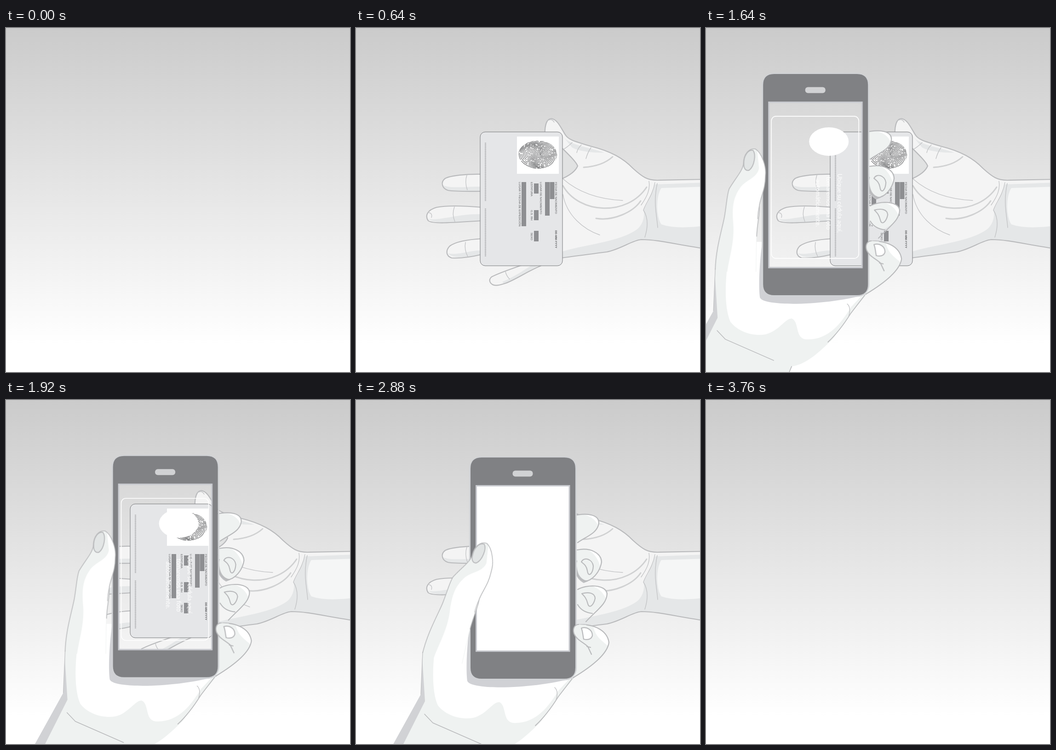
An HTML page for the animation above (3800 ms loop, 748 px wide and 748 px high).

```html
<!DOCTYPE html>
<html lang="es">
<head>
<meta charset="utf-8">
<title>Captura de cédula</title>
<style>
html, body { margin: 0; width: 100%; height: 100%; overflow: hidden; }
body { background: linear-gradient(#cbcbcb, #fff 92%); }
svg { display: block; width: 100vw; height: 100vh; }

.out { fill: none; stroke: #b9babc; stroke-width: 2.2; stroke-linecap: round; stroke-linejoin: round; }
.skin { fill: #f4f4f4; }
.skin2 { fill: #eff2f1; }
.shade { fill: #e5e7e8; }
.white { fill: #fff; }
.fold { fill: none; stroke: #d0d1d2; stroke-width: 3; stroke-linecap: round; }
.thin { fill: none; stroke: #c3c4c6; stroke-width: 1.4; stroke-linecap: round; }
.label { font: 6px "Liberation Sans", Arial, sans-serif; fill: #58595b; }
.guide text { font: 13px Lato, "Open Sans", sans-serif; fill: #fff; text-anchor: middle; }

#open, #holder, #thumb, #flash { animation: 3800ms linear infinite; }
#open { animation-name: open; transform-origin: 374px 374px; }
#holder { animation-name: holder; }
#thumb { animation-name: press; transform-origin: 145px 550px; }
#flash { animation-name: flash; }

/* quadratic ease-out on the way in, quadratic ease-in on the way out */
@keyframes open {
  0%, 1.0526% { transform: translate(650px, 0) scale(1.2); animation-timing-function: cubic-bezier(.333, .667, .667, 1); }
  16.842%, 92.632% { transform: none; animation-timing-function: cubic-bezier(.333, 0, .667, .333); }
  98.947%, 100% { transform: translate(648px, 180px); }
}
@keyframes holder {
  0%, 29.474% { transform: translate(-597px, -120px); animation-timing-function: cubic-bezier(.333, .667, .667, 1); }
  54.737%, 92.632% { transform: none; animation-timing-function: cubic-bezier(.333, 0, .667, .333); }
  98.947%, 100% { transform: translate(-396px, 648px); }
}
@keyframes press {
  0%, 64.21% { transform: none; animation-timing-function: ease-in-out; }
  75.789% { transform: rotate(12deg); animation-timing-function: ease-in-out; }
  81.053%, 100% { transform: none; }
}
@keyframes flash {
  0%, 64.21% { opacity: 0; }
  74.737%, 76% { opacity: 1; }
  81.053%, 100% { opacity: 0; }
}
</style>
</head>
<body>
<svg viewBox="0 0 748 748">
  <defs>
    <clipPath id="oval"><ellipse cx="395" cy="275.500" rx="42" ry="30.500"/></clipPath>
  </defs>

  <!-- open hand with the card -->
  <g id="open">
    <!-- fingers -->
    <g>
      <path class="skin" d="M275 318C240 317 205 321 194 327C183 335 187 349 200 353C215 356 250 355 275 355Z"/>
      <path class="shade" d="M190 342C205 350 240 344 275 345V355H210C197 354 191 349 190 342Z"/>
      <path class="out" d="M275 318C240 317 205 321 194 327C183 335 187 349 200 353C215 356 250 355 275 355"/>
      <path class="thin" d="M241 320Q236 335 242 352"/>
      <path class="skin" d="M275 390C240 387 200 385 175 390C154 396 150 409 157 419C166 426 200 424 275 419Z"/>
      <path class="shade" d="M157 415C180 420 230 402 275 405V419C230 422 170 428 157 415Z"/>
      <path class="out" d="M275 390C240 387 200 385 175 390C154 396 150 409 157 419C166 426 200 424 275 419"/>
      <path class="thin" d="M214 389Q208 405 215 421"/>
      <path class="thin" d="M156 401Q167 402 164 412"/>
      <path class="skin" d="M275 458C240 460 215 466 204 474C194 484 196 496 208 500C225 501 250 498 275 492Z"/>
      <path class="shade" d="M200 490C225 495 250 482 275 484V492C250 498 212 504 200 490Z"/>
      <path class="out" d="M275 458C240 460 215 466 204 474C194 484 196 496 208 500C225 501 250 498 275 492"/>
      <path class="thin" d="M238 466Q235 482 243 497"/>
    </g>
    <!-- thumb, palm, arm and little finger -->
    <path class="skin" d="M411 240C409 208 416 197 425 197C438 199 445 216 455 232C463 245 482 248 510 257C555 268 582 284 602 305C624 325 634 331 655 331L760 329V480C700 472 660 460 620 460C600 462 575 481 545 487C512 491 480 496 445 500L402 517C370 530 345 549 322 556C310 560 302 561 297 558C289 553 289 546 295 541C312 532 335 525 365 514Z"/>
    <path class="shade" d="M445 487C500 470 575 465 612 437C626 425 628 405 625 395C632 382 645 365 650 340L760 336V480C700 472 660 460 620 460C600 462 575 481 545 487C512 491 480 496 445 500Z"/>
    <path d="M664 348L760 345V430C725 434 690 436 664 427C652 410 652 365 664 348Z" fill="#f5f6f6"/>
    <path class="skin" d="M625 395C632 382 645 365 647 340L632 328L600 370Z"/>
    <path class="shade" d="M318 552C345 541 365 526 385 514H402C370 530 345 549 322 556Z"/>
    <path d="M445 258C462 275 478 290 482 300C477 312 462 322 445 329Z" fill="#e1e2e2"/>
    <path class="out" d="M445 258C462 275 478 290 482 300C477 312 462 322 445 329"/>
    <path class="shade" d="M452 238C468 256 510 260 540 271C518 272 484 268 470 260Z"/>
    <path class="out" d="M411 240C409 208 416 197 425 197C438 199 445 216 455 232C463 245 482 248 510 257C555 268 582 284 602 305C624 325 634 331 655 331L760 329M760 480C700 472 660 460 620 460C600 462 575 481 545 487C512 491 480 496 445 500M402 517C370 530 345 549 322 556C310 560 302 561 297 558C289 553 289 546 295 541C312 532 335 525 365 514"/>
    <path class="thin" d="M417 201Q426 196 431 205M511 260Q504 270 500 284M470 249Q460 259 449 265M490 254Q482 262 480 271M325 530Q327 539 334 546"/>
    <path class="fold" d="M450 343C485 405 590 410 632 346M495 303C525 301 546 291 558 280M522 414C560 420 603 400 619 376"/>
    <path class="thin" d="M450 362C458 408 495 438 530 450M450 328C475 350 515 372 580 375M650 336C645 365 630 380 625 396C634 410 636 430 628 455M655 338C646 380 654 405 656 434M637 333C640 350 634 365 620 385"/>

    <!-- card -->
    <rect x="270" y="226" width="179" height="291" rx="11" fill="#e5e6e8" stroke="#77787b"/>
    <path class="white" d="M350 236h91v81h-91z"/>
    <path id="print" clip-path="url(#oval)" fill="none" stroke="#58595b" stroke-width="1.100"/>
    <path fill="#8e8f92" d="M421.500 335h10v37h-10zM411 335h10v73h-10zM387 338h10v22h-10zM387 396h10v22h-10zM387 441h10v23h-10zM360 335h10v96h-10z"/>
    <g class="label" id="labels"></g>
  </g>

  <!-- hand holding the phone -->
  <g id="holder">
    <!-- palm and forearm -->
    <path class="skin2" d="M145 548L141 640L82 750L18 870H278C288 830 298 790 311 761C345 756 372 728 400 702L440 645L480 598V575H253V500L235 500Z"/>
    <path d="M144 560L141 640L80 750L18 870H42L102 750L150 655Z" fill="#d1d2d5"/>
    <path class="white" d="M171 545C165 595 167 640 178 664C195 686 228 696 255 691C284 684 298 655 312 657C328 665 318 698 341 702C390 705 418 668 440 632L470 600V575H253V490H235Z"/>
    <path class="thin" d="M145 548L141 640"/>
    <path class="out" style="stroke-width:1.700" d="M470 606L440 645Q415 685 390 708M311 761C298 790 288 830 278 870"/>
    <path d="M149 683L167 702L272 748" class="out" style="stroke-width:1.500"/>
    <path class="thin" d="M432 625Q441 633 435 652"/>
    <path d="M248 484C240 540 239 590 242 611C250 632 390 628 470 605L460 585H255Z" fill="#d0d1d5"/>

    <!-- fingertips -->
    <path class="skin2" d="M470 252C505 244 529 250 528 268C525 290 500 297 481 311L470 313Z"/>
    <path class="white" d="M498 250C518 248 528 255 526 272C520 260 512 254 498 250Z"/>
    <path class="out" d="M470 252C505 244 529 250 528 268C525 290 500 297 482 310"/>
    <path d="M478 348C474 372 477 388 495 398L505 394C488 388 483 372 484 354Z" fill="#bfc0c2"/>
    <path class="skin2" d="M481 326C510 320 533 333 534 352C530 376 512 392 499 392C481 386 477 365 481 326Z"/>
    <path class="white" d="M503 325C524 326 535 345 531 362C526 344 517 332 503 325Z"/>
    <path class="out" d="M481 326C510 320 533 333 534 352C530 376 512 394 497 394C481 388 474 370 480 350"/>
    <path class="out" d="M490 352C496 340 514 346 516 361C515 378 505 387 503 371C501 360 496 357 490 352Z"/>
    <path class="skin2" d="M478 414C500 401 543 400 546 421C545 444 525 455 509 464C492 462 480 452 478 440Z"/>
    <path class="white" d="M512 404C538 404 547 416 544 433C536 416 528 410 512 404Z"/>
    <path class="out" d="M482 412C500 401 543 400 546 421C545 444 525 455 500 482M482 445Q492 462 514 464"/>
    <path class="out" d="M491 421C505 417 519 419 520 431C517 446 507 455 504 443C501 431 497 427 491 421Z"/>
    <path class="skin2" d="M474 490C500 484 545 493 550 527C547 552 512 580 472 604Z"/>
    <path class="white" d="M516 493C540 497 552 518 548 535C538 525 522 518 516 493Z"/>
    <path class="out" d="M474 490C500 484 545 493 550 527C547 552 512 580 472 604"/>

    <!-- phone -->
    <rect x="247.500" y="124" width="231" height="484" rx="25" fill="none" stroke="#d0d2d5" stroke-width="3"/>
    <path fill="#808184" fill-rule="evenodd" d="M273 125H453Q477 125 477 149V582Q477 606 453 606H273Q249 606 249 582V149Q249 125 273 125ZM261 186V546H464V186Z"/>
    <rect x="340.500" y="153.500" width="44" height="13" rx="6" fill="#d1d2d4"/>
    <g class="guide">
      <rect x="267" y="217" width="190" height="309" rx="10" fill="none" stroke="#fff" stroke-width="1.600"/>
      <ellipse class="white" cx="392" cy="272" rx="43" ry="31"/>
      <text transform="translate(411 406) rotate(90)">Ubique su cédula aquí,</text>
      <text transform="translate(387 406) rotate(90)">tomaremos una foto</text>
      <text transform="translate(364 406) rotate(90)">automáticamente.</text>
    </g>
    <path id="flash" class="white" d="M261 186H464V546H261Z"/>
    <rect x="261.500" y="186.500" width="202.500" height="359.500" fill="none" stroke="#c9cbd0" stroke-width="3"/>

    <!-- finger curling over the edge -->
    <path class="skin2" d="M482 488C474 489 471 498 474 508C480 522 493 526 504 536L520 505L500 489Z"/>
    <path class="out" d="M484 488C474 489 471 498 474 508C480 522 493 526 504 536L512 553M502 536L510 538"/>
    <path class="out" style="fill:#fff" d="M490 496C502 492 514 500 514 512C512 521 503 522 495 520C493 510 493 503 490 496Z"/>

    <!-- thumb -->
    <g id="thumb">
      <path class="skin2" d="M145 550C146 505 160 462 165 435C170 405 170 390 175 375C190 350 203 337 206 322C206 297 220 286 232 288C247 297 256 328 254 345C254 375 245 388 241 410C242 430 236 450 235 480L234 555H150Z"/>
      <path class="white" d="M171 555C176 520 187 490 184 450C181 415 184 394 198 374C210 355 236 352 240 330L236 291C248 300 256 328 253 345C253 375 244 388 240 410C241 430 235 450 234 480L233 555Z"/>
      <path class="out" style="stroke-width:1.600" d="M145 550C146 505 160 462 165 435C170 405 170 390 175 375C190 350 203 337 206 322C206 297 220 286 232 288C247 297 256 328 254 345C254 375 245 388 241 410C242 430 236 450 235 478"/>
      <path d="M207 322C206 302 217 289 227 291C234 300 230 325 219 334C212 337 207 331 207 322Z" fill="#e2e5e5" stroke="#b9babc" stroke-width="2"/>
      <path class="thin" d="M241 410Q237 428 237 440"/>
    </g>
  </g>
</svg>
<script>
const labels = document.getElementById('labels');

function label(x, y, text, style = '') {
  const el = document.createElementNS('http://www.w3.org/2000/svg', 'text');
  el.setAttribute('transform', `translate(${x} ${y}) rotate(90)`);
  el.setAttribute('style', style);
  el.textContent = text;
  labels.append(el);
}

label(432.5, 335, 'FECHA DE NACIMIENTO');
label(432.5, 440, 'DD-MM-YYYY', 'font-weight:bold');
label(399.5, 335, 'LUGAR DE NACIMIENTO');
label(379.5, 335, 'ESTATURA');
label(379.5, 396, 'G.S. RH');
label(379.5, 445, 'SEXO');
label(353.5, 335, 'LUGAR Y FECHA DE EXPEDICIÓN');
const tiny = 'font-size:5px;fill:#8b8c8f';
label(279.5, 249, 'x'.repeat(51), tiny);
label(279.5, 392, 'x'.repeat(42), tiny);

// fingerprint: wavy rings around an off-centre core, broken at seeded spots
let seed = 7;
const random = () => (seed = seed * 16807 % 2147483647) / 2147483647;
let rings = '';
for (let r = 1.5; r < 60; r += 2.8) {
  for (let i = 0; i <= 90; i++) {
    const a = i * Math.PI / 45;
    const k = r * (1 + .06 * Math.sin(3 * a + r * .12));
    const x = 401 + k * Math.cos(a), y = 274 + k * .8 * Math.sin(a);
    const gap = random() < .06;
    rings += (i && !gap ? 'L' : 'M') + x.toFixed(1) + ' ' + y.toFixed(1);
  }
}
document.getElementById('print').setAttribute('d', rings);
</script>
</body>
</html>
```
